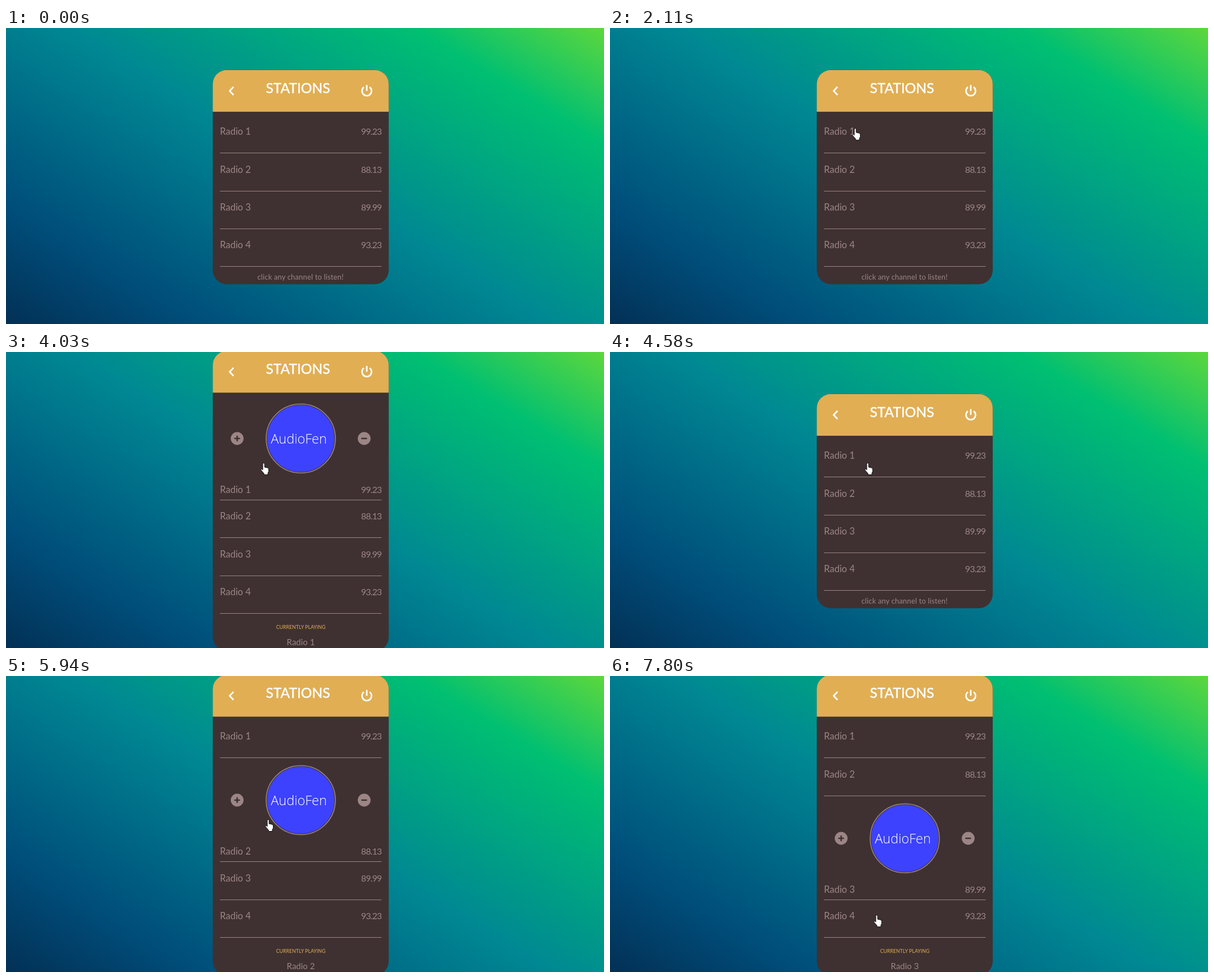
An HTML page that plays this animation: 1062x527 px, repeating every 8 s.

```html
<!DOCTYPE html>
<html lang="en">
<head>
<meta charset="utf-8">
<title>Stations</title>
<style>
  html, body { margin: 0; width: 100%; height: 100%; overflow: hidden; }
  body {
    background: linear-gradient(31.55deg, #051937 -14.5%, #004d7a 17.7%, #008793 50%, #00bf72 82.3%, #a8eb12 114.5%);
  }
  svg { display: block; width: 1062px; height: 527px; }
  text { font-family: Lato, "Open Sans", sans-serif; fill: #9c8585; }
  .title { font-size: 24.5px; fill: #fff; stroke: #fff; stroke-width: .5; }
  .name { font-size: 16.5px; }
  .freq { font-size: 16px; letter-spacing: -.9px; }
  .hint { font-size: 13px; letter-spacing: .15px; }
  .playing { font-size: 8.8px; fill: #e1ae54; }
  .current { font-size: 15px; }
  .station { font-family: "Open Sans", "Noto Sans", sans-serif; font-size: 23.5px; font-weight: 300; fill: #fff; }
  .middle { text-anchor: middle; }
  .end { text-anchor: end; }
  .icon { fill: none; stroke: #fff; stroke-width: 2.7; }
  .rule { fill: #9c8585; }
  .button circle { fill: #9c8585; }
  .button path { stroke: #3f3131; stroke-width: 2.6; stroke-linecap: round; }
  .cursor path { fill: #fff; stroke: #111; stroke-linejoin: round; }
  .cursor circle { fill: #9e9618; }
</style>
</head>
<body>
<svg viewBox="0 0 1062 527">
  <defs><clipPath id="shape"><rect id="mask" x="367.2" width="312.5" rx="25"/></clipPath></defs>
  <g clip-path="url(#shape)">
    <rect x="367" y="-10" width="313" height="560" fill="#3f3131"/>
    <g id="header">
      <rect x="367" width="313" height="74.3" fill="#e1ae54"/>
      <path class="icon" d="M404 30l-6.8 7.2 6.8 7.2"/>
      <text class="title middle" x="518.5" y="41">STATIONS</text>
      <path class="icon" d="M635.6 30.4a8.5 8.5 0 1 0 10.2 0M640.7 26.7v10.4"/>
    </g>
    <g id="rows"></g>
    <g id="player">
      <g class="button" id="plus"><circle r="11.4"/><path d="M-4 0h8M0-4v8"/></g>
      <g class="button" id="minus"><circle r="11.4"/><path d="M-4 0h8"/></g>
      <ellipse id="ring" cx="523.5" ry="61.5" fill="none" stroke="#9c8585" stroke-width="1.6"/>
      <g id="cover">
        <circle cx="523.5" r="59.8" fill="#3d42ff"/>
        <text class="station middle" x="520" y="8.5">AudioFen</text>
      </g>
    </g>
    <text class="hint middle" id="hint" x="523" y="447.5">click any channel to listen!</text>
    <g id="footer">
      <text class="playing middle" x="523.5" y="492.5">CURRENTLY PLAYING</text>
      <text class="current middle" id="current" x="523.5" y="521.5"></text>
    </g>
  </g>
  <g class="cursor" id="cursor">
    <circle id="press" cx="4.7" cy=".5" r="10.8"/>
    <path id="hand" d="M4 13V2.3a1.6 1.6 0 0 1 3.2 0V8l5.3 1.2q2 .6 2 2.5v4L13 18.8V21.5H6.3v-2L1.2 13.6q-1-1.8.5-2.3 1.2-.2 2.3 1.7z"/>
    <path id="arrow" d="M.5.5v16l3.7-3.5 2.4 5.8 2.6-1.1-2.4-5.6h5.1z"/>
  </g>
</svg>
<script>
const LOOP = 8000, TICK = 70, PRESS = 140, COVER_LOADED = 2930;
const CENTER_Y = 265.5, PITCH = 67.4, EXTRA = 117.3;

const $ = id => document.getElementById(id);
const show = (id, on) => $(id).style.display = on ? '' : 'none';
const move = (node, x, y) => node.setAttribute('transform', `translate(${x} ${y})`);

const rows = ['99.23', '88.13', '89.99', '93.23'].map((freq, i) => {
  const make = tag => document.createElementNS('http://www.w3.org/2000/svg', tag);
  const row = make('g'), labels = make('g');
  row.innerHTML = '<rect class="rule" x="380" width="287" height="1"/>';
  labels.innerHTML = `<text class="name" x="380">Radio ${i + 1}</text><text class="freq end" x="667">${freq}</text>`;
  row.append(labels);
  $('rows').append(row);
  return { row, labels };
});

const clicks = [{ at: 2310, row: 0 }, { at: 4580, row: 0 }, { at: 5670, row: 1 }, { at: 7040, row: 2 }];

// Each trip starts where the last one ended; `via` bends it.
const trips = [
  { start: 720, end: 1280, to: [613, 461], via: [398, 430] },
  { start: 1480, end: 2240, to: [434, 170], via: [402, 173] },
  { start: 2310, end: 2860, to: [461, 182] },
  { start: 3130, end: 3340, to: [469, 222] },
  { start: 3540, end: 4030, to: [452, 197] },
  { start: 4840, end: 5530, to: [460, 252], via: [453, 277] },
  { start: 5870, end: 5940, to: [460, 255] },
  { start: 6140, end: 6910, to: [462, 370], via: [429, 421] },
  { start: 7370, end: 7800, to: [468, 425] }
];
trips.forEach((trip, i) => trip.from = i ? trips[i - 1].to : [981, 257]);

const tripAt = t => trips.filter(trip => trip.start <= t).pop();

function cursorAt(t) {
  const { start, end, from, to, via } = tripAt(t);
  const time = t >= end ? end : start + Math.floor((t - start) / TICK) * TICK;
  const p = (time - start + TICK) / (end - start + TICK), q = 1 - p;
  return from.map((a, k) => {
    const bend = via ? via[k] : (a + to[k]) / 2;
    return q * q * a + 2 * q * p * bend + p * p * to[k];
  });
}

// A click toggles its row; changing rows closes the list for one tick.
function openRow(t) {
  let open = -1;
  for (const { at, row } of clicks) {
    if (t < at) break;
    const switching = open >= 0 && open !== row;
    open = open === row || switching && t < at + TICK ? -1 : row;
  }
  return open;
}

function drawCard(t) {
  const open = openRow(t), isOpen = open >= 0, loaded = t >= COVER_LOADED;
  const height = isOpen ? 534.8 : 381.4, top = CENTER_Y - height / 2;
  $('mask').setAttribute('y', top);
  $('mask').setAttribute('height', height);
  move($('header'), 0, top);
  const lineY = i => Math.floor(top + 147.8 + PITCH * i + (isOpen && i >= open ? EXTRA : 0));
  rows.forEach(({ row, labels }, i) => {
    move(row, 0, lineY(i));
    move(labels, 0, i === open ? -12.5 : -32.5);
  });
  show('player', isOpen);
  show('footer', isOpen);
  show('hint', !isOpen);
  if (isOpen) {
    const reach = loaded ? 112.8 : 92.8;
    move($('player'), 0, lineY(open) - 109);
    move($('plus'), 523.3 - reach, 0);
    move($('minus'), 523.3 + reach, 0);
    $('ring').setAttribute('rx', loaded ? 61.5 : 1.9);
    show('cover', loaded);
    $('current').textContent = `Radio ${open + 1}`;
  }
  return { from: top + 74, to: lineY(3) };
}

function draw(t) {
  const list = drawCard(t);
  const visible = t >= trips[0].start;
  show('cursor', visible);
  if (!visible) return;
  const [x, y] = cursorAt(t);
  const overRow = x > 375 && x < 663 && y > list.from && y < list.to;
  move($('cursor'), x, y);
  show('hand', overRow);
  show('arrow', !overRow);
  show('press', t >= tripAt(t).end && clicks.some(({ at }) => t >= at - PRESS && t < at));
}

const begin = performance.now();
function frame() {
  draw((performance.now() - begin) % LOOP);
  requestAnimationFrame(frame);
}
frame();
</script>
</body>
</html>
```
